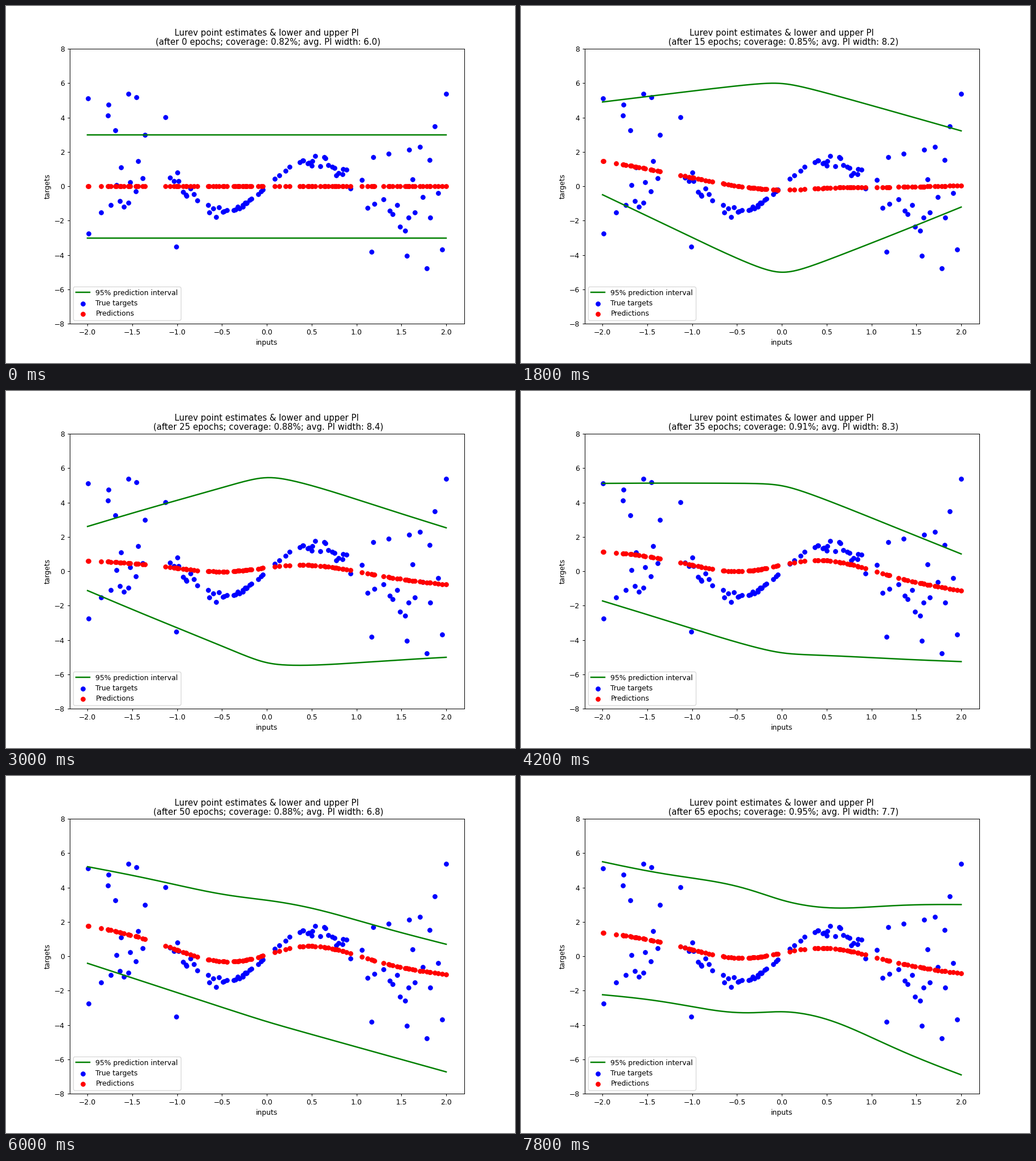
Animation, 894 px wide and 626 px high, one loop 8000 ms. Source, as a matplotlib script:

```python
import numpy as np
import matplotlib.pyplot as plt
from matplotlib.animation import FuncAnimation

DPI = 89.4
STEP_TICKS = 3          # animation ticks per training snapshot
EPOCHS_PER_STEP = 5

# Isolated points far from the mean curve
OUTLIERS = [
    (-1.995, 5.1), (-1.99, -2.74), (-1.85, -1.51), (-1.772, 4.13),
    (-1.64, -.86), (-1.545, 5.38), (-1.455, 5.18), (-1.132, 4.01),
    (-1.01, -3.53), (1.168, -3.8), (1.187, 1.71), (1.355, 1.88),
    (1.558, -4.06), (1.586, 2.13), (1.815, 1.53), (1.952, -3.68),
    (1.997, 5.38)]

# Runs of inputs: start, end, count
RUNS = [(-1.78, -1.36, 12), (-1.08, -.79, 10), (-.66, -.44, 8),
        (-.37, -.18, 12), (-.09, -.04, 3), (.1, .24, 4), (.37, .54, 8),
        (.6, .92, 12), (1.05, 1.29, 4), (1.37, 1.91, 14)]

# Epoch: coverage, width, then level, tilt, bend and wave
# of the upper bound, lower bound and point estimate
STATES = {
    0: (.82, 6.0, (3, 0, 0, 0), (-3, 0, 0, 0), (0, 0, 0, 0)),
    10: (.93, 10.0, (6.48, .4, -1.18, .15), (-5.99, -.77, 1.2, -.09),
         (.24, -.12, .01, .17)),
    15: (.85, 8.2, (6.22, -.42, -1.07, 0), (-5.52, -.18, 2.32, .03),
         (-.34, -.36, .55, .12)),
    25: (.88, 8.4, (5.81, -.02, -1.61, .07), (-5.6, -.97, 1.26, -.07),
         (.26, -.35, -.17, .37)),
    40: (.92, 8.3, (4.92, -1.53, -.8, 0), (-4.55, -.84, .42, .12),
         (.5, -.69, -.22, .75)),
    50: (.88, 6.8, (3.3, -1.13, -.17, .16), (-3.83, -1.58, .13, 0),
         (.06, -.72, .15, .83)),
    65: (.95, 7.7, (3.15, -.62, .55, -.32), (-3.06, -1.17, -.75, .4),
         (.19, -.6, 0, .6)),
}


def make_data():
    """Sine with noise that grows with the square of the input."""
    rng = np.random.default_rng(4)
    x = np.concatenate([np.linspace(*run) for run in RUNS])
    x += rng.uniform(-.015, .015, x.size)
    noise = np.clip(rng.normal(0, .7, x.size), -1.2, 1.2)
    y = 1.5 * np.sin(np.pi * x) + noise * x ** 2
    out_x, out_y = np.transpose(OUTLIERS)
    return np.append(x, out_x), np.append(y, out_y)


def curve(x, params):
    """Tilted line with a rounded corner at zero and an odd wave."""
    level, tilt, bend, wave = params
    corner = np.sqrt(x ** 2 + .05)
    ripple = x / .6 * np.exp(.5 - (x / .6) ** 2 / 2)
    return level + tilt * x + bend * corner + wave * ripple


def state_at(epoch):
    """Known snapshot, or a blend of the two around it."""
    before = max(e for e in STATES if e <= epoch)
    after = min(e for e in STATES if e >= epoch)
    t = (epoch - before) / max(after - before, 1)
    return [(1 - t) * np.array(a) + t * np.array(b)
            for a, b in zip(STATES[before], STATES[after])]


x_data, y_data = make_data()
x_line = np.linspace(-2, 2, 200)

fig, ax = plt.subplots(figsize=(894 / DPI, 626 / DPI), dpi=DPI)
targets = ax.scatter(x_data, y_data, color="blue")
predictions = ax.scatter(x_data, 0 * x_data, color="red")
upper_line, = ax.plot(x_line, 0 * x_line, color="green", lw=2)
lower_line, = ax.plot(x_line, 0 * x_line, color="green", lw=2)
ax.set_xlim(-2.2, 2.2)
ax.set_ylim(-8, 8)
ax.set_xlabel("inputs")
ax.set_ylabel("targets")
title = ax.set_title("", linespacing=1.07)
ax.legend([upper_line, targets, predictions],
          ["95% prediction interval", "True targets", "Predictions"],
          loc="lower left", labelspacing=.43, borderpad=.37)


def update(tick):
    epoch = tick // STEP_TICKS * EPOCHS_PER_STEP
    coverage, width, upper, lower, mid = state_at(epoch)
    upper_line.set_ydata(curve(x_line, upper))
    lower_line.set_ydata(curve(x_line, lower))
    predictions.set_offsets(np.column_stack([x_data, curve(x_data, mid)]))
    title.set_text("Lurev point estimates & lower and upper PI\n"
                   f" (after {epoch} epochs; coverage: {coverage:.2f}%; "
                   f"avg. PI width: {width:.1f})")
    return upper_line, lower_line, predictions, title


anim = FuncAnimation(fig, update, frames=40, interval=200, repeat=True)
plt.show()
```
